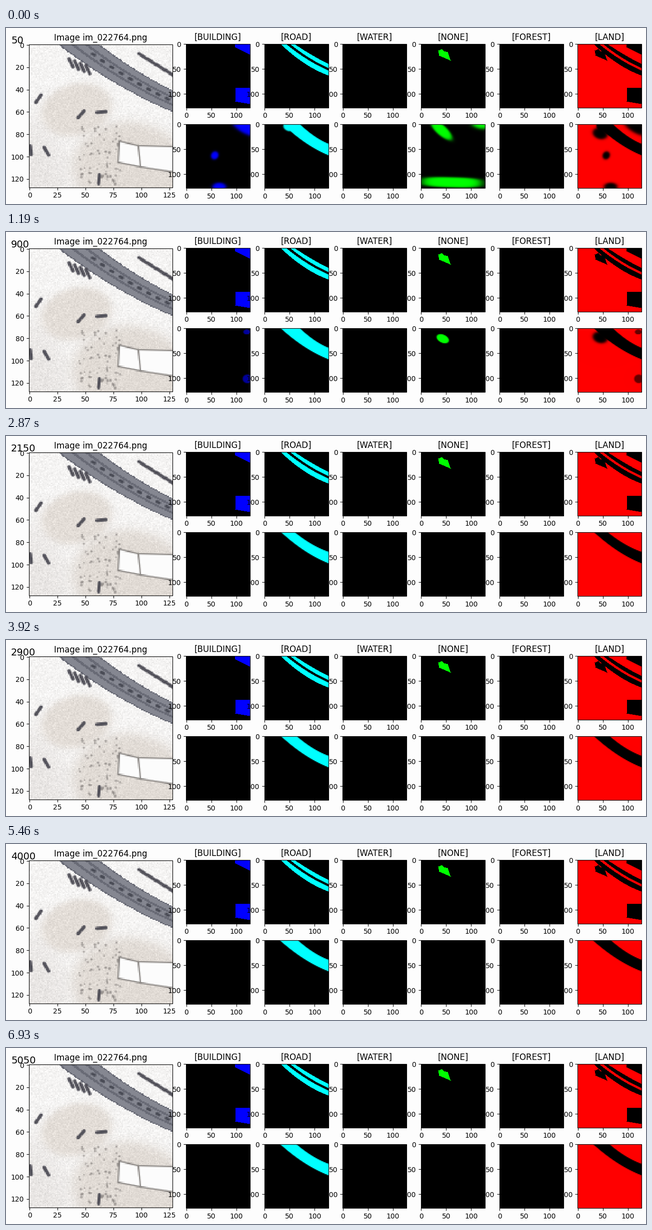
A matplotlib script that plays this animation: 1280x353 px, repeating every 7 s.

```python
import numpy as np
import matplotlib.pyplot as plt
from matplotlib.animation import FuncAnimation
from matplotlib.colors import to_rgb
from matplotlib.patches import Rectangle
from matplotlib.path import Path

W, H, DPI, N = 1280, 353, 100, 128
FRAMES = 100
PAPER = "#fdfdfd"
plt.rcParams["font.family"] = "DejaVu Sans"

Y, X = np.mgrid[:N, :N].astype(float)
# Predictions come from a half-resolution grid
PX, PY = X // 2 * 2 + 0.5, Y // 2 * 2 + 0.5


def sigmoid(v):
    return 1 / (1 + np.exp(-np.clip(v, -50, 50)))


def poly(*pts):
    cells = np.c_[X.ravel(), Y.ravel()]
    return Path(pts).contains_points(cells, radius=1e-6).reshape(N, N) * 1.0


def stroke(x0, y0, x1, y1, width):
    dx, dy = x1 - x0, y1 - y0
    t = np.clip(((X - x0) * dx + (Y - y0) * dy) / (dx * dx + dy * dy + 1e-9), 0, 1)
    dist = np.hypot(X - x0 - t * dx, Y - y0 - t * dy)
    return np.clip(width / 2 - dist + 0.5, 0, 1)


def blob(x, y, rx, ry, deg=0, soft=0.1, power=2):
    c, s = np.cos(np.radians(deg)), np.sin(np.radians(deg))
    u, v = (PX - x) * c + (PY - y) * s, (PY - y) * c - (PX - x) * s
    r = (np.abs(u / rx) ** power + np.abs(v / ry) ** power) ** (1 / power)
    return sigmoid((1 - r) / soft)


def edge(x, start, end, bow):
    """Bowed road edge from (start, 0) to (N, end)."""
    t = (x - start) / (N - start)
    return end * (t + bow * t * (1 - t))


def tint(mask, color):
    return np.clip(mask, 0, 1)[..., None] * np.array(to_rgb(color))


# ---------- aerial view, built from flat shapes ----------
def aerial():
    rng = np.random.default_rng(4)
    img = np.ones((N, N, 3)) * to_rgb("#f5f4f3")

    def paint(mask, color, alpha=1.0):
        a = mask[..., None] * alpha
        img[:] = img * (1 - a) + np.array(to_rgb(color)) * a

    # fields divided by pale tracks
    paint(blob(0, 128, 34, 60, 0, 0.15), "#e9e6e4")
    paint(blob(42, 58, 32, 23, -15, 0.06), "#e3ddd7")
    paint(blob(90, 112, 52, 43, 10, 0.06), "#e1dbd5")
    img[:] += rng.normal(0, 0.022, (N, N, 1))
    for x, y in rng.uniform((44, 72), (82, 126), (70, 2)):
        paint(stroke(x, y, x, y, rng.uniform(1, 2.4)), "#87827f", 0.7)

    # highway with lanes and traffic
    low, top = edge(X, 26, 60, 0.3), edge(X, 63, 41, 0.2)
    across = (Y - top) / (low - top)
    inside = (across > 0) & (across < 1) & (X > 20)
    paint(inside * 1.0, "#858791")
    paint(inside * (np.cos(across * 6 * np.pi) > 0.6), "#686a75")
    for x in np.linspace(56, 122, 9):
        y = (edge(x, 26, 60, 0.3) + edge(x, 63, 41, 0.2)) / 2
        paint(stroke(x, y, x + 2, y + 1, 2.6), "#494b55")

    # white roofs
    roof = [(80, 86), (97, 90), (130, 91), (130, 114), (99, 109), (79, 105)]
    paint(poly(*roof), "#fcfcfc")
    for p, q in [*zip(roof, roof[1:] + roof[:1]), (roof[1], roof[4])]:
        paint(stroke(*p, *q, 1.3), "#8d8986")

    # vehicles: parked rows, then loose ones by centre and heading
    cars = [(37 + 5 * k, 16 + 2 * k, 65) for k in range(4)]
    cars += [(101 + 8 * k, 10 + 5 * k, 35) for k in range(4)]
    cars += [(8, 48, -55), (46, 62, -50), (64, 60, -5), (15, 95, 60), (1, 94, 85), (62, 120, 95)]
    for x, y, deg in cars:
        dx, dy = 4 * np.cos(np.radians(deg)), 4 * np.sin(np.radians(deg))
        paint(stroke(x - dx, y - dy, x + dx, y + dy, 3), "#4d4c55", 0.95)
    return np.clip(img, 0, to_rgb(PAPER)[0])


# ---------- ground truth ----------
def lane(low, top):
    return ((Y < edge(X, *low)) & (Y >= edge(X, *top))) * 1.0


building = poly((98, -1), (128, -1), (128, 21), (98, 6)) + poly((99, 88), (128, 88), (128, 120), (98, 115))
road = lane((32, 63, 0.45), (43, 53, 0.3)) + lane((51, 48, 0.3), (60, 40, 0.15))
none = poly((34, 13), (41, 10), (45, 14), (53, 16), (59, 33), (36, 23))
empty = np.zeros((N, N))

CLASSES = [("[BUILDING]", "#0000ff", building), ("[ROAD]", "#00ffff", road),
           ("[WATER]", "#000000", empty), ("[NONE]", "#00ff00", none),
           ("[FOREST]", "#000000", empty), ("[LAND]", "#ff0000", 1 - building - road - none)]


# ---------- predictions ----------
def hump(f, mid, half):
    """Rise, plateau and fall around a moment."""
    return np.clip(1.5 * (1 - ((f - mid) / half) ** 2), 0, 1)


def predict(f):
    fade = max(0, 1 - f / 9)

    # first guesses die out, two houses swell later and vanish
    houses = fade * (blob(120, 4, 31, 14, 28, 0.12) + blob(57, 62, 7, 8, 30, 0.16)
                     + blob(66, 125, 13, 8, 0, 0.16))
    grow = hump(f, 27, 13)
    if grow > 0:
        houses = houses + grow * (blob(121, 7, 11 * grow, 8 * grow, 0, 0.06)
                                  + blob(122, 101, 15 * grow, 14 * grow, 0, 0.06))

    # road edges swing and settle
    low = 34 - f / 30 + 2.5 * np.exp(-f / 80) * np.cos(f / 8)
    top = 65 + 11 * np.exp(-f / 45) * np.cos((f - 10) / 10)
    street = (sigmoid((edge(PX, low, 62, 0.4) - PY) / 0.35)
              * sigmoid((PY - edge(PX, top, 39, 0.4)) / 0.35))
    street = np.maximum(street, fade * blob(48, 5, 11, 8, 20, 0.08))

    other = fade * (blob(40, 11, 27, 10, 42) + blob(119, -1, 18, 9, 10, 0.2)
                    + blob(61, 116, 59, 10, 1.5, 0.1, 3))
    other = other + hump(f, 16, 13) * blob(43, 20.5, 13, 8, 25, 0.05)

    hole = hump(f, 8, 20) * blob(45, 18, 15, 11, 15, 0.12)
    land = (1 - np.clip(houses, 0, 1)) * (1 - street) * (1 - hole)
    return {"[BUILDING]": houses, "[ROAD]": street, "[NONE]": other, "[LAND]": land}


# ---------- layout in pixels ----------
fig = plt.figure(figsize=(W / DPI, H / DPI), dpi=DPI, facecolor=PAPER)
ax = fig.add_axes([0, 0, 1, 1])
ax.axis("off")
ticks_x, ticks_y = [], []


def panel(x, y, size, data, xticks, yticks, title=None):
    scale = size / N
    im = ax.imshow(data, extent=(x, x + size, y + size, y), aspect="auto",
                   interpolation="nearest", zorder=1)
    ax.add_patch(Rectangle((x, y), size, size, fill=False, lw=0.8, ec="k", zorder=2))
    for v in xticks:
        px = x + (v + 0.5) * scale
        ticks_x.append((px, y + size))
        ax.text(px, y + size + 9.7, str(v), size=10, ha="center", va="top", zorder=4)
    for v in yticks:
        py = y + (v + 0.5) * scale
        ticks_y.append((x, py))
        ax.text(x - 9.7, py, str(v), size=10, ha="right", va="center_baseline", zorder=4)
    if title:
        ax.text(x + size / 2, y - 8.3, title, size=12, ha="center", va="baseline", zorder=4)
    return im


panel(46, 33, 286.6, aerial(), range(0, 126, 25), range(0, 121, 20), "Image im_022764.png")
marks = (0, 50, 100)
preds = {}
for i, (name, color, truth) in enumerate(CLASSES):
    left = 360 + 156.65 * i
    panel(left, 31.8, 128, tint(truth, color), marks, marks, name)
    preds[name] = panel(left, 192.8, 128, tint(empty, color), marks, marks), color

for pts, marker in ((ticks_x, 3), (ticks_y, 0)):
    ax.plot(*zip(*pts), ls="", marker=marker, ms=3.5, mew=0.8, color="k", zorder=3)
counter = ax.text(10, 31, "", size=14, va="baseline", zorder=5)
ax.set(xlim=(0, W), ylim=(H, 0))


def update(f):
    # the log skips step 1000
    counter.set_text(str(50 * (f + 1 + (f >= 19))))
    for name, mask in predict(f).items():
        im, color = preds[name]
        im.set_data(tint(mask, color))
    return [counter]


anim = FuncAnimation(fig, update, frames=FRAMES, interval=70, repeat=True, repeat_delay=0)
plt.show()
```
